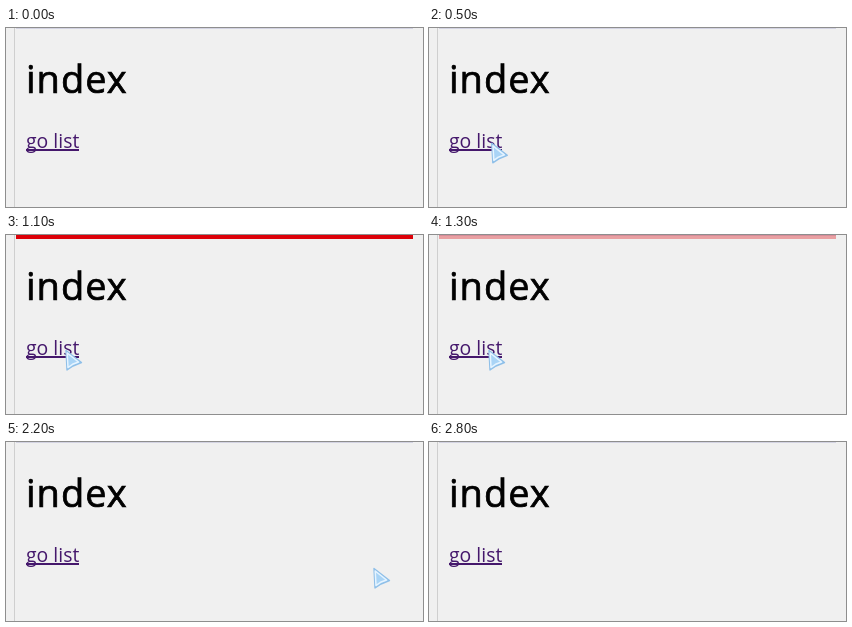
Recreate the animation shown at these times as an HTML page. Size 417x179 px, loop 2900 ms.

```html
<!DOCTYPE html>
<html lang="en">
<head>
<meta charset="utf-8">
<title>index</title>
<style>
  html, body { margin: 0; width: 100%; height: 100%; overflow: hidden; background: #f0f0f0; }
  svg { display: block; width: 417px; height: 179px; }
  text { font-family: "Open Sans", "Noto Sans", sans-serif; }
  #title { font-size: 38px; letter-spacing: 1px; stroke: #000; stroke-width: .7px; }
  #link { font-size: 19.4px; }
</style>
</head>
<body>
<svg viewBox="0 0 417 179">
  <defs>
    <linearGradient id="sky">
      <stop offset="0" stop-color="#a9cdee"/>
      <stop offset=".6" stop-color="#adcff0"/>
      <stop offset="1" stop-color="#a6c9ee"/>
    </linearGradient>
    <filter id="soft" x="-10%" y="-30%" width="120%" height="160%">
      <feGaussianBlur stdDeviation="2.4"/>
    </filter>
    <clipPath id="pane"><rect x="22" y="122" width="420" height="90" rx="4"/></clipPath>
  </defs>

  <rect width="417" height="179" fill="#f0f0f0"/>
  <rect x="8" width="1" height="179" fill="#cfcfcf"/>
  <rect x="10" width="397" height="1" fill="#d3d3e2"/>
  <rect id="bar" x="10" width="397" height="4" fill="#dc0008"/>

  <text id="title" x="20" y="65">index</text>
  <g id="link">
    <text x="20" y="120">go list</text>
    <rect x="20" y="121" width="53" height="2"/>
  </g>

  <g id="window">
    <rect x="19" y="118.5" width="430" height="100" rx="6" opacity=".5" filter="url(#soft)"/>
    <rect x="20.5" y="120.5" width="430" height="100" rx="5" fill="#dcecfa" stroke="#1c2734"/>
    <g clip-path="url(#pane)">
      <rect x="22" y="122" width="400" height="60" fill="url(#sky)"/>
      <path d="M22 122H198L190 134 160 137 140 146 112 139 88 157 62 164 50 179H22Z" fill="#bddcef"/>
      <path d="M22 122H88L72 133 50 138 38 152 22 158Z" fill="#b0d3ee"/>
      <path d="M318 122H334L382 179H362Z" fill="#a0c4ec"/>
      <path d="M350 122H362L417 172V179H404Z" fill="#b5d5f2"/>
      <rect x="210.5" y="177.5" width="179" height="20" rx="2" fill="#c3dcf5" stroke="#7ba3d4"/>
    </g>
  </g>

  <g id="cursor" stroke-linejoin="round">
    <path d="M1 .5 2 20 8 16 16.500 12.500Z" fill="#a9d4f6" stroke="#8fbfe8" stroke-width="1.400"/>
    <path d="M2.200 3 3 17.500 7.500 14.300 13.500 12Z" fill="none" stroke="#e6f4ff" stroke-width="1.500"/>
  </g>
</svg>
<script>
  const LOOP = 2900, TICK = 100;
  const HOME = [238, 104], LINK = [59, 115], REST = [65, 115], EXIT = [367, 126];
  const [cursor, bar, link, win] =
    ["cursor", "bar", "link", "window"].map(id => document.getElementById(id));

  // Progress from 0 to 1 between two times.
  const ramp = (t, from, to) => Math.min(1, Math.max(0, (t - from) / (to - from)));
  const within = (t, from, to) => t >= from && t < to;
  const mix = (a, b, p) => a.map((v, i) => v + (b[i] - v) * p);
  const easeOut = p => 1 - (1 - p) ** 6;
  const show = (node, on) => node.style.display = on ? "" : "none";

  function pointer(t) {
    if (t < 1700) return mix(HOME, LINK, easeOut(ramp(t, 200, 800)));
    return mix(REST, EXIT, ramp(t, 2000, 2200));
  }

  const start = performance.now();

  function draw(now) {
    const elapsed = Math.max(0, now - start) % LOOP;
    const t = Math.floor(elapsed / TICK) * TICK;

    show(cursor, within(t, 100, 2300));
    cursor.setAttribute("transform", `translate(${pointer(t)})`);

    // The bar fills in two steps, then fades and lingers briefly.
    show(bar, within(t, 1000, 1500));
    bar.setAttribute("width", 397 * ramp(t, 900, 1100));
    bar.setAttribute("opacity", 1 - ramp(Math.min(t, 1300), 1100, 1400));

    link.setAttribute("fill", within(t, 800, 1000) ? "#e00000" : "#45186c");
    show(win, within(t, 2300, 2800));
    requestAnimationFrame(draw);
  }
  draw(start);
</script>
</body>
</html>
```
